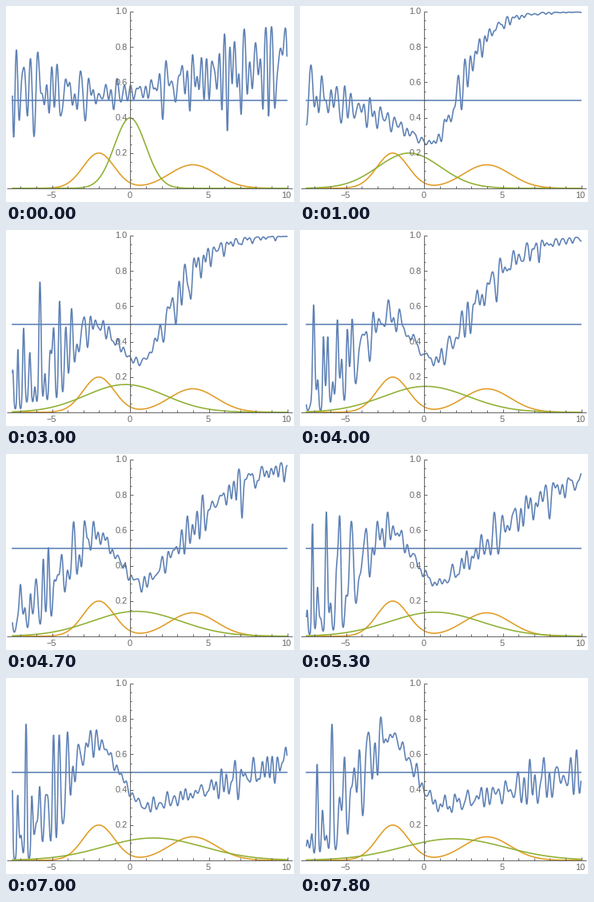
Recreate the animation shown at these times as a matplotlib script. Size 360 by 245 pixels, loop 8000 ms.

```python
import numpy as np
import matplotlib.pyplot as plt
from matplotlib.animation import FuncAnimation

W, H, DPI = 360, 245, 100
FRAMES, INTERVAL = 80, 100
PT = 72 / DPI
BLUE, ORANGE, GREEN, GREY = "#5E81B5", "#E19C24", "#8FB032", "#666666"
WARMUP, LAST = 6, 47  # training steps

rng = np.random.default_rng(11)
WAVES = 30
FREQ = 2 * np.pi * rng.uniform(0.9, 3.5, WAVES)
PHASE = rng.uniform(0, 2 * np.pi, WAVES)
DRIFT = rng.normal(0, 0.5, WAVES)

x = np.linspace(-7.5, 10, 1000)


def px(v):
    return 155.1 + 19.6 * np.asarray(v)


def py(v):
    return 227.8 - 220.3 * np.asarray(v)


def mix(a, b, t):
    return a + (b - a) * t


def bell(mean, sigma):
    return np.exp(-((x - mean) / sigma) ** 2 / 2) / (sigma * np.sqrt(2 * np.pi))


def progress(step):
    """Warm-up share and share of the training that follows it."""
    warm = min(step / WARMUP, 1)
    return warm, max(step - WARMUP, 0) / (LAST - WARMUP)


def generator(step):
    warm, t = progress(step)
    mean = mix(0, mix(-0.95, 1.9, t ** 1.2), warm)
    sigma = mix(1, mix(2, 3.27, t ** 0.7), warm)
    return bell(mean, sigma)


def noise(step):
    waves = np.sin(np.outer(x, FREQ) + PHASE + DRIFT * step)
    return waves.sum(axis=1) * 0.6 / np.sqrt(WAVES / 2)


def trend(left, hill, trough, right):
    """Rounded polyline over the four landmarks of the curve, in logits."""
    shifts = np.linspace(-0.6, 0.6, 13)
    knots, values = [-7.5, -2.2, 0.7, 10], [left, hill, trough, right]
    return np.mean([np.interp(x + d, knots, values) for d in shifts], axis=0)


def discriminator(step):
    warm, t = progress(step)
    fade = (1 + np.cos(np.pi * t)) / 2
    early = min(t / 0.3, 1)

    trough = mix(-1.2, -0.85, t)
    level = trend(mix(0.2, -2.3, early), mix(-0.45, 1.1, t ** 0.8),
                  trough, trough + 9.3 * mix(0.09, 0.9, fade))
    west = np.maximum(-x - 1, 0) / 6.5
    east = np.maximum(x - 1, 0) / 9
    wobble = (0.13 + mix(0.5, 2.2, early) * west ** 1.5
              + mix(0.3, 1.0, fade) * east ** 0.8)

    level = mix(trend(0.3, 0.1, 0.2, 1.0), level, warm)
    wobble = mix(0.13 + 0.12 * np.abs(x), wobble, warm)
    return 1 / (1 + np.exp(-level - wobble * noise(step)))


fig = plt.figure(figsize=(W / DPI, H / DPI), dpi=DPI, facecolor="white")
ax = fig.add_axes([0, 0, 1, 1])
ax.set_xlim(0, W)
ax.set_ylim(H, 0)
ax.axis("off")


def curve(y, color):
    return ax.plot(px(x), py(y), color=color, lw=1.6 * PT,
                   solid_joinstyle="round")[0]


def rule(xs, ys):
    ax.plot(xs, ys, color=GREY, lw=PT, solid_capstyle="butt", zorder=3)


def label(u, v, text, ha):
    ax.text(u, v, text, ha=ha, va="center_baseline", color=GREY,
            family="Liberation Sans", size=11 * PT, zorder=3)


X_AXIS, Y_AXIS = 227.5, 154.5
rule([1, 358], [X_AXIS] * 2)
rule([Y_AXIS] * 2, [7, 228])
for n in range(-7, 11):
    u = np.floor(px(n)) + 0.5 if n else Y_AXIS
    rule([u, u], [X_AXIS, X_AXIS - (4 if n % 5 == 0 else 2.5)])
for n in range(1, 21):
    v = np.floor(py(n / 20)) + 0.5
    rule([Y_AXIS, Y_AXIS + (4 if n % 4 == 0 else 2.5)], [v, v])
for n in (-5, 0, 5, 10):
    label(px(n) - 0.4, 236, str(n).replace("-", "\u2212"), "center")
for n in range(1, 6):
    label(151.5, py(n / 5) - 1, f"{n / 5:.1f}", "right")

curve(np.full_like(x, 0.5), BLUE)
wiggle = curve(np.zeros_like(x), BLUE)
curve(0.5 * bell(-2, 1) + 0.5 * bell(4, 1.5), ORANGE)
model = curve(np.zeros_like(x), GREEN)


def update(i):
    step = (6 * i + 3) // 10  # six training steps a second
    wiggle.set_ydata(py(discriminator(step)))
    model.set_ydata(py(generator(step)))
    return wiggle, model


anim = FuncAnimation(fig, update, frames=FRAMES, interval=INTERVAL,
                     init_func=lambda: update(0), repeat=True, repeat_delay=0)
plt.show()
```
